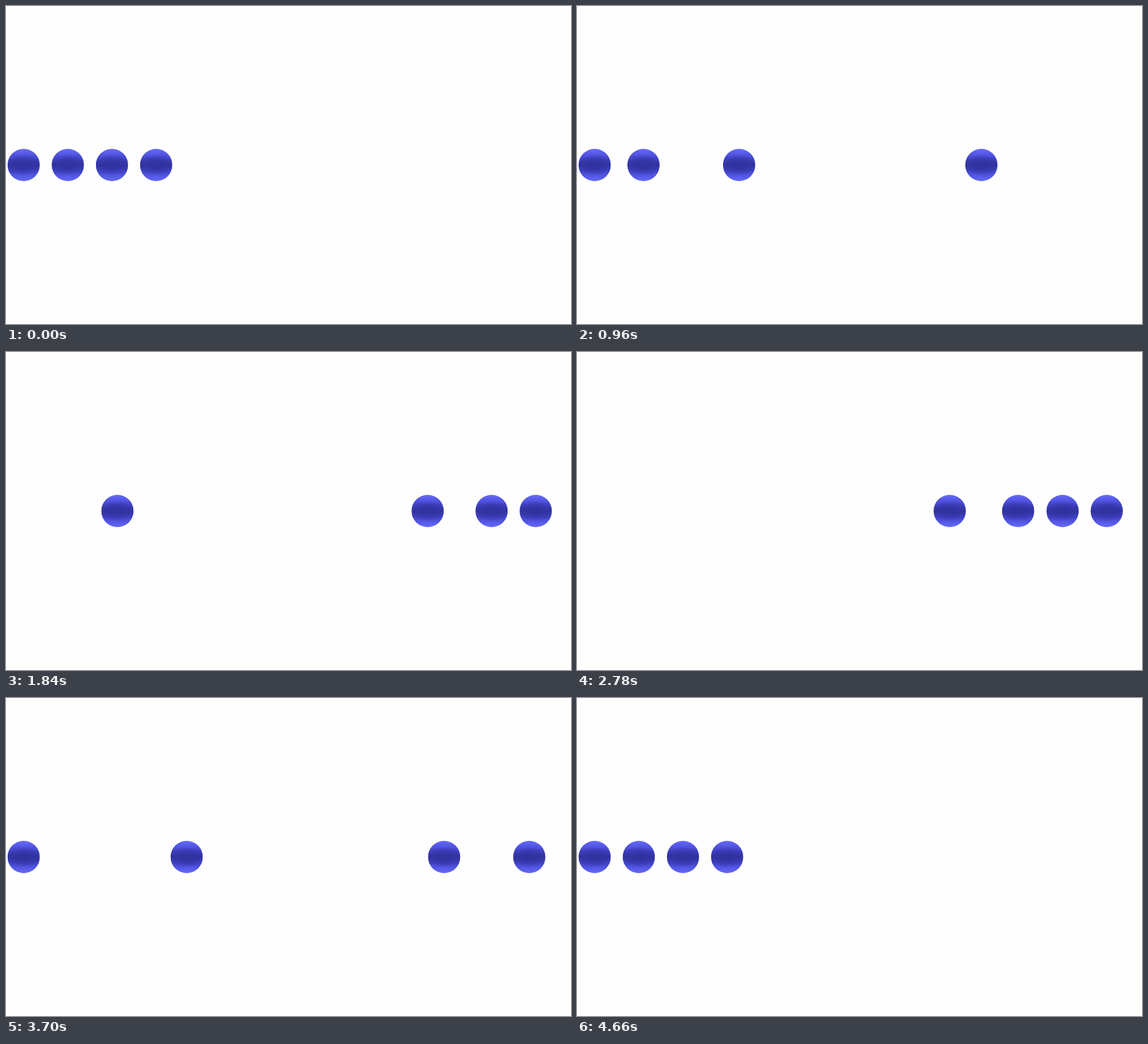
Recreate the animation shown at these times as an HTML page. Size 998x561 px, loop 4740 ms.

```html
<!DOCTYPE html>
<html lang="en">
<head>
<meta charset="utf-8">
<title>Sliding balls</title>
<style>
  html, body { margin: 0; width: 100%; height: 100%; overflow: hidden; background: #fefefe; }
  .ball {
    position: absolute;
    left: 0;
    top: 252.1px;
    width: 56.8px;
    height: 56.8px;
    border-radius: 50%;
    background:
      radial-gradient(34px 18px, #3233a0 25%, #3233a000),
      linear-gradient(#666bf6, #5356e4 17%, #4345cb 30%, #31329c 50%, #4345cb 70%, #5356e4 83%, #666bf6);
  }
</style>
</head>
<body>
<script>
const LOOP = 4740, TRAVEL = 1183, DISTANCE = 670.5;

// Start times of the way out and the way back, rightmost ball first
const balls = [
  { home: 236.7, out: -4, back: 3465 },
  { home: 158.7, out: 360, back: 3138 },
  { home: 80.7, out: 758, back: 2730 },
  { home: 2.7, out: 1117, back: 2352 },
];

for (const ball of balls) {
  ball.node = document.createElement('div');
  ball.node.className = 'ball';
  document.body.append(ball.node);
}

// cubic-bezier(.945, 0, .743, 1)
function ease(u) {
  if (u <= 0) return 0;
  if (u >= 1) return 1;
  let low = 0, high = 1, s;
  for (let i = 0; i < 24; i++) {
    s = (low + high) / 2;
    const r = 1 - s;
    const x = 3 * 0.945 * s * r * r + 3 * 0.743 * s * s * r + s * s * s;
    if (x < u) low = s; else high = s;
  }
  return s * s * (3 - 2 * s);
}

function draw(now) {
  const t = now % LOOP;
  for (const { home, out, back, node } of balls) {
    const progress = ease((t - out) / TRAVEL) - ease((t - back) / TRAVEL);
    node.style.transform = `translateX(${home + DISTANCE * progress}px)`;
  }
}

const start = performance.now();
function tick() {
  draw(performance.now() - start);
  requestAnimationFrame(tick);
}
tick();
</script>
</body>
</html>
```
